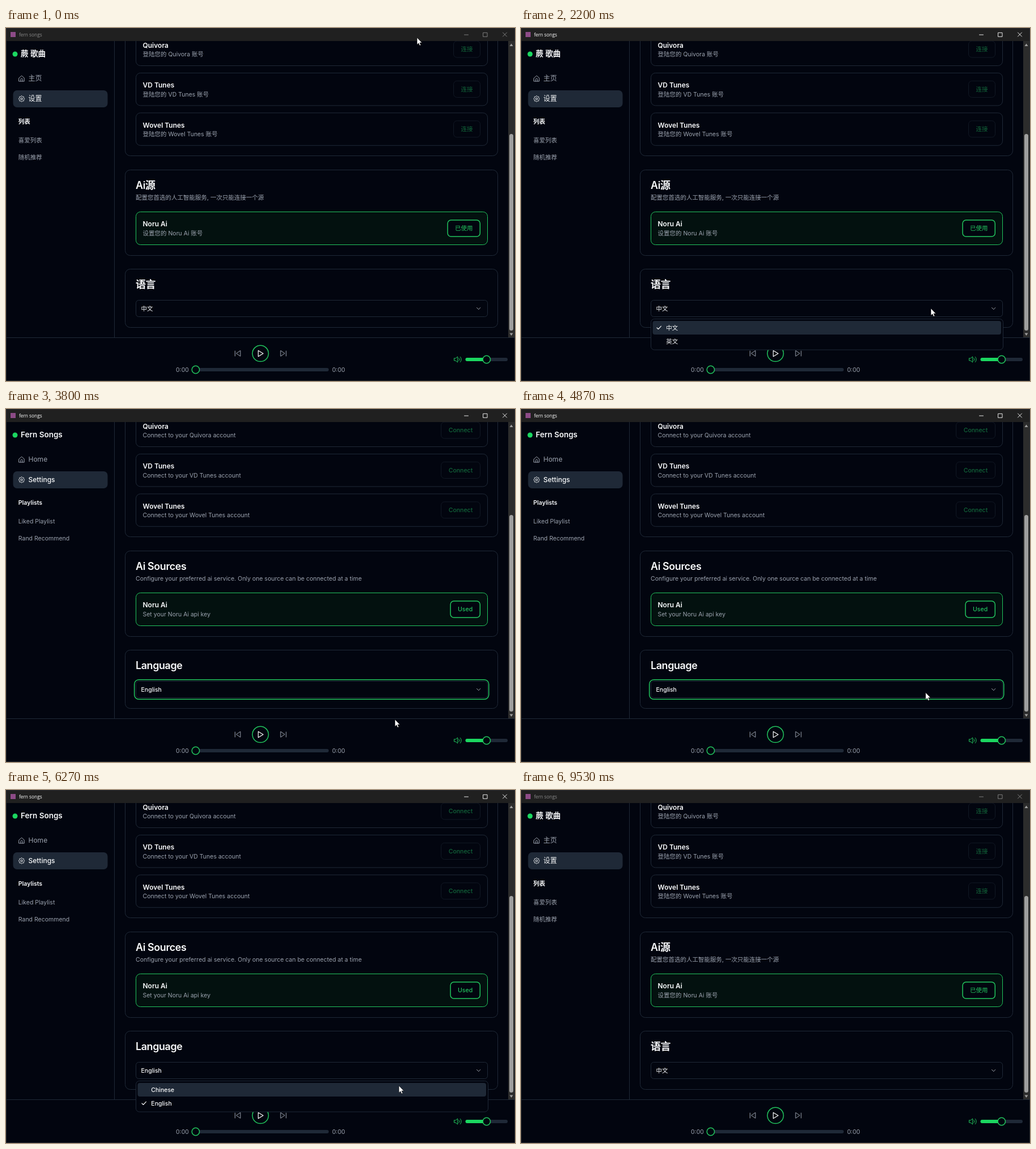
Write an HTML page that moves like this. It is 899 by 623 pixels and loops after 9.94 s.

```html
<!DOCTYPE html>
<html lang="zh">
<head>
<meta charset="utf-8">
<title>fern songs</title>
<style>
  html, body { margin: 0; width: 100%; height: 100%; overflow: hidden; background: #02050f; }
  svg { display: block; width: 899px; height: 623px; font-family: Inter, "Noto Sans CJK SC", sans-serif; white-space: pre; }
</style>
</head>
<body>
<svg id="stage" viewBox="0 0 899 623"></svg>
<script>
const stage = document.getElementById('stage');
const LOOP = 9940, TICK = 200 / 3;
const BG = '#02050f', LINE = '#1f2937', GRAY = '#9ca3af', WHITE = '#f9fafb';
const GREEN = '#22c55e', BRIGHT = '#1bd760', FAINT = '#12653a';

// Pointer moves: first tick, last tick, end x, end y, sideways bow
const MOVES = [
  [1, 6, 681, 394, -26],
  [11, 23, 724, 495, 0],
  [40, 49, 687, 548, 0],
  [65, 74, 715, 500, 0],
  [86, 94, 694, 522, 0],
  [119, 126, 117, 616, 0],
  [131, 133, 79, 620, 0]
];

function pointerAt(k) {
  let x = 726, y = 17;
  for (const [first, last, endX, endY, bow] of MOVES) {
    if (k < first) break;
    const p = Math.min(1, (k - first + 1) / (last - first + 1));
    const e = Math.sin(p * Math.PI / 2);
    x += (endX - x) * e + bow * Math.sin(Math.PI * e);
    y += (endY - y) * e;
  }
  return [x, y];
}

const text = (x, y, s, size = 10.5, fill = GRAY, weight = 400, extra = '') =>
  `<text x="${x}" y="${y}" font-size="${size}" fill="${fill}" font-weight="${weight}" ${extra}>${s}</text>`;
const box = (x, y, x2, y2, r, stroke = LINE, fill = 'none', width = 1) =>
  `<rect x="${x}" y="${y}" width="${x2 - x}" height="${y2 - y}" rx="${r}" stroke="${stroke}" fill="${fill}" stroke-width="${width}"/>`;
const fillBox = (x, y, x2, y2, r, fill) => box(x, y, x2, y2, r, 'none', fill);
const line = (d, stroke = GRAY, width = 1, fill = 'none') =>
  `<path d="${d}" stroke="${stroke}" stroke-width="${width}" fill="${fill}" stroke-linecap="round" stroke-linejoin="round"/>`;
const ring = (x, y, r, stroke, fill = BG, width = 1.5) =>
  `<circle cx="${x}" cy="${y}" r="${r}" stroke="${stroke}" fill="${fill}" stroke-width="${width}"/>`;
const heading = (y, s) => text(229, y, s, 18, WHITE, 600, 'letter-spacing="-.45"');

function gear(cx, cy) {
  const points = Array.from({ length: 64 }, (_, i) => {
    const a = i * Math.PI / 32, r = 4.6 + .6 * Math.cos(8 * a);
    return (cx + r * Math.sin(a)).toFixed(2) + ' ' + (cy - r * Math.cos(a)).toFixed(2);
  });
  return line('M' + points.join('L') + 'Z', WHITE) + ring(cx, cy, 1.7, WHITE, 'none', 1);
}

function sidebar(en) {
  return line('M191.5 23V546', LINE)
    + ring(16, 46, 4.5, 'none', BRIGHT)
    + text(26, 50, en ? 'Fern Songs' : '蕨 歌曲', 13.5, WHITE, 600)
    + line('M23 88.2L27.6 84.2L32.2 88.2V94H23ZM26 94V90.6A1.6 1.6 0 0 1 29.2 90.6V94')
    + text(39.5, 93.4, en ? 'Home' : '主页', 12)
    + fillBox(12.5, 110, 179.5, 140, 7, LINE)
    + gear(27.6, 125)
    + text(39.5, 129.4, en ? 'Settings' : '设置', 12, WHITE, 500)
    + text(21.8, 169.3, en ? 'Playlists' : '列表', 10.5, WHITE, 600)
    + text(21.8, 202.2, en ? 'Liked Playlist' : '喜爱列表')
    + text(21.8, 232.2, en ? 'Rand Recommend' : '随机推荐');
}

function service(name, y, en) {
  const left = en ? 768.5 : 790.5;
  return box(229.5, y, 850.5, y + 57.5, 8)
    + text(241.5, y + 25.7, name, 12, WHITE, 600)
    + text(241.5, y + 41.4, en ? `Connect to your ${name} account` : `登陆您的 ${name} 账号`)
    + box(left, y + 14, 837.5, y + 43, 6, '#111824')
    + text((left + 837.5) / 2, y + 32.3, en ? 'Connect' : '连接', 10.5, FAINT, 500, 'text-anchor="middle"');
}

function settings(en, focusRing) {
  const used = en ? 785 : 780;
  return box(210.5, -60, 868.5, 225.5, 9)
    + ['Quivora', 'VD Tunes', 'Wovel Tunes'].map((name, i) => service(name, 9 + i * 70.4, en)).join('')
    + box(210.5, 250.5, 868.5, 401.5, 9)
    + heading(284, en ? 'Ai Sources' : 'Ai源')
    + text(229, 302.6, en
      ? 'Configure your preferred ai service. Only one source can be connected at a time'
      : '配置您首选的人工智能服务, 一次只能连接一个源')
    + box(229.5, 324.5, 850.5, 382.5, 8, GREEN, '#03110f')
    + text(241.5, 350.4, 'Noru Ai', 12, WHITE, 600)
    + text(241.5, 366.2, en ? 'Set your Noru Ai api key' : '设置您的 Noru Ai 账号')
    + box(used, 339, 837.3, 368, 6, GREEN, BG, 1.5)
    + text((used + 837.3) / 2, 357.2, en ? 'Used' : '已使用', 10.5, GREEN, 500, 'text-anchor="middle"')
    + box(210.5, 425.5, 868.5, 528.5, 9)
    + heading(459.2, en ? 'Language' : '语言')
    + box(229.5, 480.5, 850.5, 509.5, 5)
    + text(238.5, 498.7, en ? 'English' : '中文', 10.5, WHITE, 500)
    + line('M831.5 493.5L834.7 496.7L837.9 493.5')
    + (focusRing ? box(226.7, 477.7, 852.7, 512.3, 8, GREEN, 'none', 1.5) : '');
}

function scrollbar() {
  const thumb = '#9f9f9f';
  return fillBox(887, 23, 898, 547, 0, '#2c2c2c')
    + fillBox(889, 187, 896, 534, 3.5, thumb)
    + line('M889.5 32L892.5 27.5L895.5 32Z', 'none', 0, thumb)
    + line('M889.5 538.5L892.5 543L895.5 538.5Z', 'none', 0, thumb);
}

function player() {
  return fillBox(0, 546, 899, 623, 0, BG)
    + line('M0 546.5H899', LINE)
    + line('M404.5 570V579M414 569.7V579.3L407 574.5Z')
    + ring(449.4, 574.4, 14.2, GREEN)
    + line('M445.5 569.2V579.8L454.3 574.5Z', WHITE, 1.2)
    + line('M485 569.7V579.3L492 574.5ZM494.8 570V579')
    + text(300, 606.5, '0:00') + text(576, 606.5, '0:00')
    + fillBox(333, 600, 570, 606, 3, LINE)
    + ring(335, 603, 6.7, GREEN)
    + line('M791.5 583V587H794L797.7 590V580L794 583ZM800 582.7A3.3 3.3 0 0 1 800 587.3M802.3 580.4A6.5 6.5 0 0 1 802.3 589.6', GREEN)
    + fillBox(811.5, 582, 886, 588, 3, LINE)
    + fillBox(811.5, 582, 849, 588, 3, BRIGHT)
    + ring(848.8, 585, 6.7, GREEN);
}

function menu(en, pointerY, progress) {
  const selected = en ? 1 : 0;
  const active = pointerY < 517 ? selected : pointerY < 541 ? 0 : 1;
  const e = 1 - (1 - progress) ** 2, scale = .95 + .05 * e;
  const rowY = i => 517 + 24 * i, checkY = rowY(selected) + 12;
  const labels = en ? ['Chinese', 'English'] : ['中文', '英文'];
  return `<g opacity="${e}" transform="translate(540.5 ${513 - 8 * (1 - e)}) scale(${scale}) translate(-540.5 -513)">`
    + box(229.5, 513.5, 851.5, 568, 6, LINE, BG)
    + fillBox(232.5, rowY(active), 848, rowY(active) + 24, 4, LINE)
    + labels.map((s, i) => text(256.3, rowY(i) + 15.6, s, 10.5, WHITE, 500)).join('')
    + line(`M240 ${checkY}L242.5 ${checkY + 2.5}L247.5 ${checkY - 2.8}`, WHITE, 1.1)
    + '</g>';
}

function titleBar(focused) {
  const ink = focused ? '#fff' : '#8a8a8a';
  return fillBox(0, 0, 899, 23, 0, '#202020')
    + fillBox(8, 7, 17, 16, 0, '#8c4b86')
    + text(23, 15, 'fern songs', 8.3, ink, 400, 'font-family="Open Sans, Noto Sans, sans-serif"')
    + line('M809.5 12H816.5M843 8.3H850V15.3H843ZM877.5 8L884.5 15M884.5 8L877.5 15', ink, .9);
}

function scene(k) {
  const [x, y] = pointerAt(k);
  const en = k >= 57 && k < 103;
  const focused = k >= 30 && k < 143;
  const focusRing = k >= 57 && k < 78 || k >= 104 && k < 143;
  const open = k >= 32 && k < 57 || k >= 78 && k < 103;
  const opened = k < 57 ? 31 : 78;
  const progress = Math.min(1, ((k - opened) * TICK + 40) / 150);
  return fillBox(0, 0, 899, 623, 0, BG)
    + sidebar(en) + settings(en, focusRing) + scrollbar() + player()
    + (open ? menu(en, y, progress) : '')
    + titleBar(focused)
    + box(.5, .5, 898.5, 622.5, 0, '#25282d')
    + (k < 133 ? `<path transform="translate(${x} ${y})" d="M0 0V12.3L2.8 9.7L4.6 14L6.6 13.2L4.8 8.9H8.6Z" fill="#fff" stroke="#000" stroke-width=".5"/>` : '');
}

let shown = -1;
function play() {
  const k = Math.floor((performance.now() % LOOP + 3.4) / TICK);
  if (k !== shown) stage.innerHTML = scene(shown = k);
  requestAnimationFrame(play);
}
play();
</script>
</body>
</html>
```
